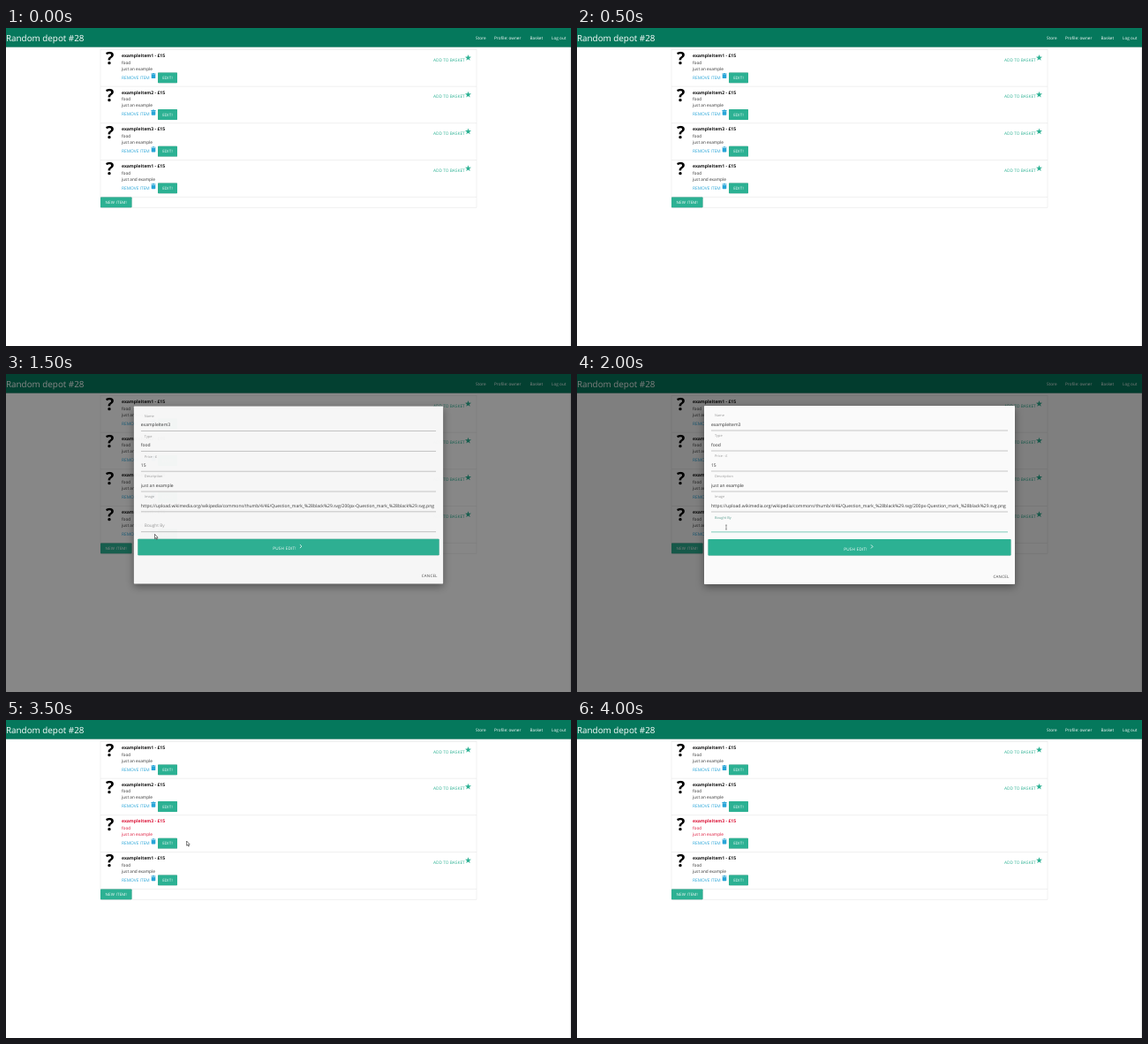
An HTML page that plays this animation: 640 px wide and 360 px high, repeating every 4.5 s.

```html
<!DOCTYPE html>
<html lang="en">
<head>
<meta charset="utf-8">
<title>Shop item editor</title>
<style>
  html, body { margin: 0; width: 100%; height: 100%; overflow: hidden; background: #fff; }
  svg { display: block; width: 100%; height: 100%; }
  text { font-family: "Open Sans", "Noto Sans", sans-serif; text-rendering: geometricPrecision; white-space: pre; }
  .bold { font-weight: 700; }
  .button { letter-spacing: .2px; text-anchor: middle; }
  .raised { filter: drop-shadow(0 .7px .6px rgba(0, 0, 0, .28)); }
  .dialog { filter: drop-shadow(0 3px 5px rgba(0, 0, 0, .4)); }
</style>
</head>
<body>
<svg id="stage" viewBox="0 0 640 360"></svg>
<script>
const GREEN = '#05785c', TEAL = '#2cb193', BLUE = '#28a5d8', RED = '#dc1438';
const INK = '#333', GREY = '#9a9a9a', LINE = '#e6e6e6';
const STEP = 500, ROW_HEIGHT = 41.7;

const items = [
  ['exampleItem1', 'just an example'],
  ['exampleItem2', 'just an example'],
  ['exampleItem3', 'just an example'],
  ['exampleItem1', 'just and example'],
];
const fields = [
  ['Name', 'exampleItem3'],
  ['Type', 'food'],
  ['Price - £', '15'],
  ['Description', 'just an example'],
  ['Image', 'https://upload.wikimedia.org/wikipedia/commons/thumb/4/46/Question_mark_%28black%29.svg/200px-Question_mark_%28black%29.svg.png'],
];

// One state per half second; pointer is [shape, x, y].
const opening = { dialog: true, scale: .995, opacity: .97, dim: .47 };
const editing = { dialog: true, scale: 1, opacity: 1, dim: .5, focused: true };
const states = [
  {},
  {},
  { pointer: ['hand', 189.6, 142.6] },
  { ...opening, pointer: ['arrow', 168.5, 181.3] },
  { ...editing, typed: '', pointer: ['beam', 169, 171] },
  { ...editing, typed: 'example', pointer: ['beam', 169, 171] },
  { ...editing, typed: 'example', pointer: ['arrow', 209.5, 198.8] },
  { bought: true, pointer: ['arrow', 204.6, 137] },
  { bought: true },
];

const text = (x, y, string, size, fill = INK, style = '') =>
  `<text x="${x}" y="${y}" font-size="${size}" fill="${fill}" class="${style}">${string}</text>`;
const rect = (x, y, width, height, fill, extra = '') =>
  `<rect x="${x}" y="${y}" width="${width}" height="${height}" fill="${fill}" ${extra}/>`;
const path = (d, fill, extra = '') => `<path d="${d}" fill="${fill}" ${extra}/>`;
const button = (x, y, width, height, label) =>
  rect(x, y, width, height, TEAL, 'rx=".7" class="raised"') +
  text(x + width / 2, y + height / 2 + 1.7, label, 4.5, '#fff', 'button');

function star(cx, cy, radius) {
  const points = Array.from({ length: 10 }, (_, i) => {
    const angle = i * Math.PI / 5, r = i % 2 ? radius * .4 : radius;
    return `${cx + r * Math.sin(angle)},${cy - r * Math.cos(angle)}`;
  });
  return `<polygon points="${points.join(' ')}" fill="${TEAL}"/>`;
}

function header() {
  const links = [[532, 'Store'], [553, 'Profile: owner'], [593.5, 'Basket'], [618, 'Log out']];
  return rect(0, 0, 640, 21.6, GREEN, 'class="raised"') +
    text(0, 15, 'Random depot #28', 9.85, '#fff') +
    links.map(([x, label]) => text(x, 12.7, label, 4.7, '#fff')).join('');
}

function row([name, description], index, bought) {
  const trash = 'M164.4 51.4h1.5l.5-.5h1.2l.5.5h1.5v.8h-5.2zM164.7 52.6h4.6v3.8q0 .7-.7.7h-3.2q-.7 0-.7-.7z';
  const basket = text(484, 37.7, 'ADD TO BASKET', 4.8, TEAL) + star(523.5, 33.8, 3.7);
  return `<g transform="translate(0 ${index * ROW_HEIGHT})">` +
    text(113, 41.4, '?', 19.5, '#000', 'bold') +
    text(131, 33, `${name} - £15`, 5.05, bought ? RED : '#111', 'bold') +
    text(131, 40.5, 'food', 4.75, bought ? RED : INK) +
    text(131, 47.7, description, 4.75, bought ? RED : INK) +
    text(131, 57.7, 'REMOVE ITEM', 4.85, BLUE) + path(trash, BLUE) +
    button(172, 50.4, 22, 11.8, 'EDIT!') +
    (bought ? '' : basket) +
    rect(107, 65.8, 426, .6, LINE) + '</g>';
}

function shop(bought) {
  return rect(0, 0, 640, 360, '#fff') + rect(638.8, 21, 1.2, 339, '#e8e8e8') +
    rect(107, 24.5, 426, 178.7, 'none', `stroke="${LINE}" stroke-width=".6"`) +
    items.map((item, i) => row(item, i, bought && i === 2)).join('') +
    button(107, 191.5, 35.5, 11.7, 'NEW ITEM!') + header();
}

function dialog({ dim, scale, opacity, focused, typed }) {
  const field = ([label, value], i) => {
    const y = i * 23;
    return text(156, y + 48.4, label, 3.9, GREY) + text(152, y + 58.8, value, 5.03) +
      rect(152, y + 63.7, 336, .6, '#a2a2a2');
  };
  const lastField = focused
    ? text(156, 163.9, 'Bought By', 3.9, '#5f9f92') + text(152, 173.8, typed, 5.03) + rect(152, 178.5, 336, .8, '#62bfac')
    : text(156, 173.3, 'Bought By', 4.8, GREY) + rect(152, 178.7, 336, .6, '#a2a2a2');
  return rect(0, 0, 640, 360, '#000', `opacity="${dim}"`) +
    `<g opacity="${opacity}" transform="translate(320 137) scale(${scale}) translate(-320 -137)">` +
    rect(144, 36, 352, 202, '#fafafa', 'rx=".7" class="dialog"') +
    '<clipPath id="inputs"><rect x="152" y="40" width="336" height="142"/></clipPath>' +
    `<g clip-path="url(#inputs)">${fields.map(field).join('')}${lastField}</g>` +
    rect(148.5, 187, 343, 18.5, TEAL, 'rx=".7" class="raised"') +
    text(315.5, 199.7, 'PUSH EDIT!', 4.7, '#fff', 'button') +
    path('M333 193.4l2 2-2 2', 'none', 'stroke="#fff" stroke-width=".8"') +
    text(480.5, 230.7, 'CANCEL', 4.5, '#444', 'button') + '</g>';
}

function pointer([shape, x, y]) {
  const outline = 'stroke="#111" stroke-width=".55" stroke-linejoin="round"';
  const shapes = {
    arrow: path('M0 0V5.2L1.2 4.2 2 6.1 2.8 5.7 2 3.9H3.6Z', '#fff', outline),
    hand: path('M.3 0Q.9-.5 1.2.2V2.1L3.4 2.6Q3.9 2.8 3.7 3.6L3.2 5.8H.7L-1 3.7Q-1 3 .2 3.6Z', '#fff', outline),
    beam: path('M-.8 0H.8M0 0V5M-.8 5H.8', 'none', 'stroke="#222" stroke-width=".45"'),
  };
  return `<g transform="translate(${x} ${y})">${shapes[shape]}</g>`;
}

const stage = document.getElementById('stage');
let shown = -1;

function play() {
  const index = Math.floor(performance.now() / STEP) % states.length;
  if (index !== shown) {
    const state = states[index];
    stage.innerHTML = shop(state.bought) +
      (state.dialog ? dialog(state) : '') +
      (state.pointer ? pointer(state.pointer) : '');
    shown = index;
  }
  requestAnimationFrame(play);
}
play();
</script>
</body>
</html>
```
